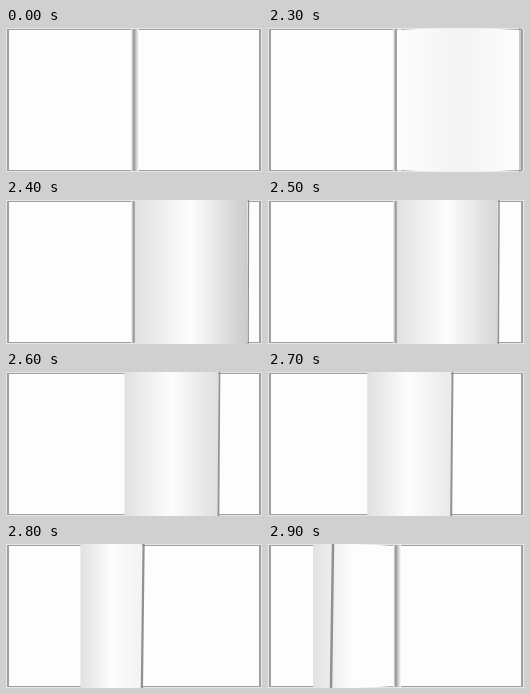
An HTML page with a canvas for the animation above (3 s loop, 256 px wide and 144 px high).

```html
<!DOCTYPE html>
<html>
<head>
<meta charset="utf-8">
<title>Turning page</title>
<style>
html, body { margin: 0; height: 100%; overflow: hidden; background: #fdfdfd; }
canvas { display: block; width: 100vw; height: 100vh; }
</style>
</head>
<body>
<canvas width="256" height="144"></canvas>
<script>
const ctx = document.querySelector('canvas').getContext('2d');
const LOOP = 3000, TURN = 2300, STEP = 100, LAST = 6;
const PAPER = 253, SPINE = 128;

const grey = v => `rgb(${v},${v},${v})`;

function shade(x0, x1, greys) {
  const g = ctx.createLinearGradient(x0, 0, x1, 0);
  greys.forEach((v, i) => g.addColorStop(i / (greys.length - 1), grey(v)));
  return g;
}

function rect(x, y, w, h, fill) {
  ctx.fillStyle = fill;
  ctx.fillRect(x, y, w, h);
}

function drawBook() {
  rect(0, 0, 256, 144, grey(230));
  rect(1, 1, 254, 142, grey(160));
  rect(3, 2, 250, 140, grey(PAPER));
  rect(125, 1, 8, 142, shade(125, 133, [PAPER, 150, 205, PAPER]));
}

// The curled sheet, bowed at the top and bottom where it lies flat
function drawSheet(x0, x1, dip0, dip1, fill) {
  const mid = (x0 + x1) / 2, bow = -(dip0 + dip1) / 2;
  ctx.beginPath();
  ctx.moveTo(x0, dip0);
  ctx.quadraticCurveTo(mid, bow, x1, dip1);
  ctx.lineTo(x1, 144 - dip1);
  ctx.quadraticCurveTo(mid, 144 - bow, x0, 144 - dip0);
  ctx.fillStyle = fill;
  ctx.fill();
}

function drawEdge(x, lean, width) {
  ctx.beginPath();
  ctx.moveTo(x + lean, 0);
  ctx.lineTo(x - lean, 144);
  ctx.strokeStyle = grey(145);
  ctx.lineWidth = width;
  ctx.stroke();
}

function drawCurl(step) {
  const p = step / LAST, lifted = Math.min(step, 1);
  // The free edge speeds up; the fold leaves the spine after two steps
  const edge = 251 - 188 * (0.3 * p + 0.7 * p ** 3.6);
  const left = SPINE + 1 - 84 * (Math.max(0, step - 2) / 4) ** 1.5;
  const right = Math.max(edge, SPINE - 2);
  const greys = [
    PAPER - 28 * lifted,
    PAPER - 10 * (1 - lifted),
    PAPER - 60 * (1 - p) * lifted
  ];
  const dip = 2 * (1 - lifted);
  drawSheet(left, right, dip, right > edge ? 2 : dip, shade(left, right, greys));
  drawEdge(edge + 1, p, 1 + 1.5 * p);
}

function draw() {
  const time = performance.now() % LOOP;
  drawBook();
  if (time >= TURN) drawCurl(Math.floor((time - TURN) / STEP));
  requestAnimationFrame(draw);
}
draw();
</script>
</body>
</html>
```
